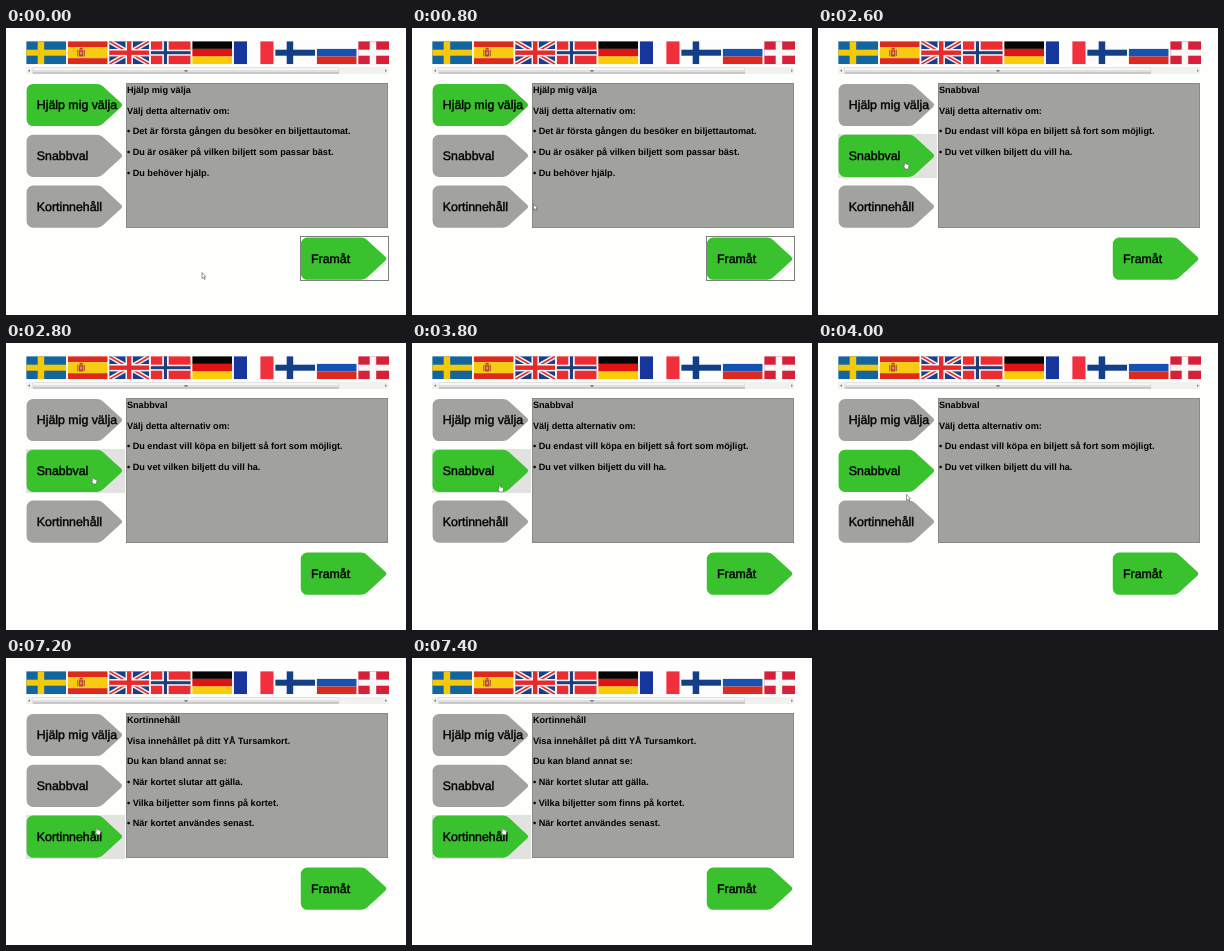
An HTML page with a canvas that plays this animation: 400x287 px, repeating every 8 s.

```html
<!DOCTYPE html>
<html lang="sv">
<head>
<meta charset="utf-8">
<title>Biljettautomat</title>
<style>
html, body { margin: 0; width: 100%; height: 100%; overflow: hidden; background: #fefefc; }
canvas { display: block; width: 400px; height: 287px; }
</style>
</head>
<body>
<canvas id="stage"></canvas>
<script>
const W = 400, H = 287, LOOP = 8000;
const GREEN = '#39c12e', GRAY = '#a2a39e', INK = '#020202';
const FONT = '"Liberation Sans", Arial, sans-serif';
const canvas = document.getElementById('stage');
const ctx = canvas.getContext('2d');
const dpr = window.devicePixelRatio || 1;
canvas.width = W * dpr;
canvas.height = H * dpr;

const labels = ['Hjälp mig välja', 'Snabbval', 'Kortinnehåll'];
const pages = [
  ['Välj detta alternativ om:',
   '• Det är första gången du besöker en biljettautomat.',
   '• Du är osäker på vilken biljett som passar bäst.',
   '• Du behöver hjälp.'],
  ['Välj detta alternativ om:',
   '• Du endast vill köpa en biljett så fort som möjligt.',
   '• Du vet vilken biljett du vill ha.'],
  ['Visa innehållet på ditt YÅ Tursamkort.',
   'Du kan bland annat se:',
   '• När kortet slutar att gälla.',
   '• Vilka biljetter som finns på kortet.',
   '• När kortet användes senast.']
];

// Each track holds [start time, ...values] and jumps between entries.
const selected = [[0, 0], [2600, 1], [7200, 2]];
const hovered = [[0, -1], [1200, 1], [4000, -1], [4200, 2]];
const pointer = [
  [0, arrow, 196, 244.5], [800, arrow, 121.5, 176], [1000, hand, 89.5, 141],
  [1200, hand, 85, 133.3], [3800, hand, 85.5, 141.3], [4000, arrow, 88.5, 151.5],
  [4200, hand, 88.5, 161], [4400, hand, 89, 171], [4600, hand, 88.8, 169]
];
const at = (track, t) => track.filter(k => k[0] <= t).pop().slice(1);

function rect(color, x, y, w, h) {
  ctx.fillStyle = color;
  ctx.fillRect(x, y, w, h);
}

function frame(color, x, y, w, h) {
  ctx.strokeStyle = color;
  ctx.lineWidth = 1;
  ctx.strokeRect(x, y, w, h);
}

function poly(points, fill, stroke, width) {
  ctx.beginPath();
  points.forEach(([x, y]) => ctx.lineTo(x, y));
  ctx.closePath();
  ctx.fillStyle = fill;
  ctx.fill();
  if (stroke) {
    ctx.strokeStyle = stroke;
    ctx.lineWidth = width;
    ctx.stroke();
  }
}

function line(color, width, x1, y1, x2, y2) {
  ctx.strokeStyle = color;
  ctx.lineWidth = width;
  ctx.beginPath();
  ctx.moveTo(x1, y1);
  ctx.lineTo(x2, y2);
  ctx.stroke();
}

function text(str, x, y, font) {
  ctx.font = font + ' ' + FONT;
  ctx.fillStyle = INK;
  ctx.fillText(str, x, y);
}

// Flags are drawn in a 40 by 23 box.
function cross(ground, outer, inner) {
  rect(ground, 0, 0, 40, 23);
  rect(outer, 11.5, 0, 6.5, 23);
  rect(outer, 0, 8.5, 40, 6);
  if (inner) {
    rect(inner, 13.2, 0, 3.1, 23);
    rect(inner, 0, 10, 40, 3);
  }
}

function bands(colors, sizes, upright) {
  let p = 0;
  colors.forEach((c, i) => {
    if (upright) rect(c, p, 0, sizes[i], 23);
    else rect(c, 0, p, 40, sizes[i]);
    p += sizes[i];
  });
}

function spain() {
  bands(['#dd2a1c', '#f7cb12', '#dd2a1c'], [6, 11, 6]);
  rect('#b8623a', 9.4, 8.5, 1.3, 6.5);
  rect('#b8623a', 16, 8.5, 1.3, 6.5);
  rect('#c23a2c', 11.3, 9, 4.2, 6.3);
  rect('#c79a72', 12.4, 10.4, 2, 3);
  rect('#b04428', 11.8, 6.6, 3.2, 1.8);
}

function britain() {
  rect('#17408c', 0, 0, 40, 23);
  [['#f6f4f4', 4.6], ['#e52a2c', 1.6]].forEach(([c, w]) => {
    line(c, w, 0, 0, 40, 23);
    line(c, w, 0, 23, 40, 0);
  });
  rect('#f6f4f4', 16.3, 0, 7.4, 23);
  rect('#f6f4f4', 0, 7.8, 40, 7.4);
  rect('#e52a2c', 17.8, 0, 4.4, 23);
  rect('#e52a2c', 0, 9.3, 40, 4.4);
}

const flags = [
  () => cross('#12659f', '#f4c90a'),
  spain,
  britain,
  () => cross('#ec2c30', '#f8f6f6', '#1c3f7c'),
  () => bands(['#050505', '#e01410', '#f8cd08'], [7.7, 7.6, 7.7]),
  () => bands(['#17369d', '#fdfdfd', '#f22f3c'], [13.3, 13.4, 13.3], true),
  () => cross('#fdfdfd', '#123f88'),
  () => bands(['#fdfdfd', '#1553b2', '#dc2a20'], [7.7, 7.6, 7.7]),
  () => cross('#d6203a', '#fbf8f8')
];

function flagRow() {
  ctx.save();
  ctx.beginPath();
  ctx.rect(20, 12, 363, 25);
  ctx.clip();
  ctx.translate(20.2, 13.2);
  flags.forEach(flag => {
    ctx.save();
    ctx.beginPath();
    ctx.rect(0, 0, 40, 23);
    ctx.clip();
    flag();
    ctx.restore();
    ctx.translate(41.5, 0);
  });
  ctx.restore();
}

function scrollbar() {
  rect('#f1f1f0', 20, 39, 362, 7);
  rect('#d4d4d4', 26.5, 39.5, 306.5, 6);
  rect('#f6f6f6', 27, 40, 305.5, 2.5);
  rect('#e0e0e0', 27, 42.5, 305.5, 2);
  rect('#b4b4b4', 27, 44.5, 306, 1);
  rect('#777', 178.5, 42, 3, 1.6);
  poly([[23.8, 41.3], [23.8, 44.1], [22.2, 42.7]], '#666');
  poly([[379.3, 41.3], [379.3, 44.1], [380.9, 42.7]], '#666');
}

function button(label, x, y, w, color) {
  const h = 42.2, right = x + w, bend = right - 23;
  ctx.beginPath();
  ctx.moveTo(x, y + h / 2);
  ctx.arcTo(x, y, x + 20, y, 6.5);
  ctx.arcTo(bend, y, right, y + h / 2, 9);
  ctx.arcTo(right, y + h / 2, bend, y + h, 3);
  ctx.arcTo(bend, y + h, x + 20, y + h, 9);
  ctx.arcTo(x, y + h, x, y + h / 2, 6.5);
  ctx.closePath();
  ctx.fillStyle = color;
  ctx.fill();
  text(label, x + 10.2, y + 25.2, '12.35px');
  ctx.strokeStyle = INK;
  ctx.lineWidth = 0.4;
  ctx.strokeText(label, x + 10.2, y + 25.2);
}

function panel(page) {
  rect('#a1a29d', 120, 55, 262, 144.5);
  frame('#898a85', 120.5, 55.5, 261, 144);
  [labels[page], ...pages[page]].forEach((s, i) => text(s, 120.9, 64.8 + 20.7 * i, 'bold 9.15px'));
}

function arrow() {
  poly([[0, 0], [0, 6], [1.3, 4.8], [2.3, 7], [3.2, 6.6], [2.3, 4.5], [4, 4.4]], '#fff', '#555', 0.6);
}

function hand() {
  poly([[1.5, 0.4], [2.5, 0.4], [2.7, 2.7], [5.3, 3.3], [5.9, 4.2], [5.3, 7.7],
    [2.3, 7.7], [0.4, 4.6], [1.5, 4.4]], '#fff', '#555', 0.5);
}

function draw(t) {
  const [sel] = at(selected, t), [hot] = at(hovered, t);
  const [shape, px, py] = at(pointer, t);
  ctx.setTransform(dpr, 0, 0, dpr, 0, 0);
  ctx.textRendering = 'geometricPrecision';
  rect('#fefefc', 0, 0, W, H);
  flagRow();
  scrollbar();
  labels.forEach((label, i) => {
    const y = 55.9 + 50.8 * i;
    if (i === hot) rect('#e2e2e1', 20, Math.floor(y), 99, 44);
    button(label, 20.6, y, 96.7, i === sel ? GREEN : GRAY);
  });
  panel(sel);
  button('Framåt', 294.8, 209.6, 86.7, GREEN);
  if (sel === 0) frame('#808080', 294.5, 208.5, 88, 44);
  ctx.translate(px, py);
  shape();
}

const start = performance.now();
function tick() {
  draw((performance.now() - start) % LOOP);
  requestAnimationFrame(tick);
}
tick();
</script>
</body>
</html>
```
